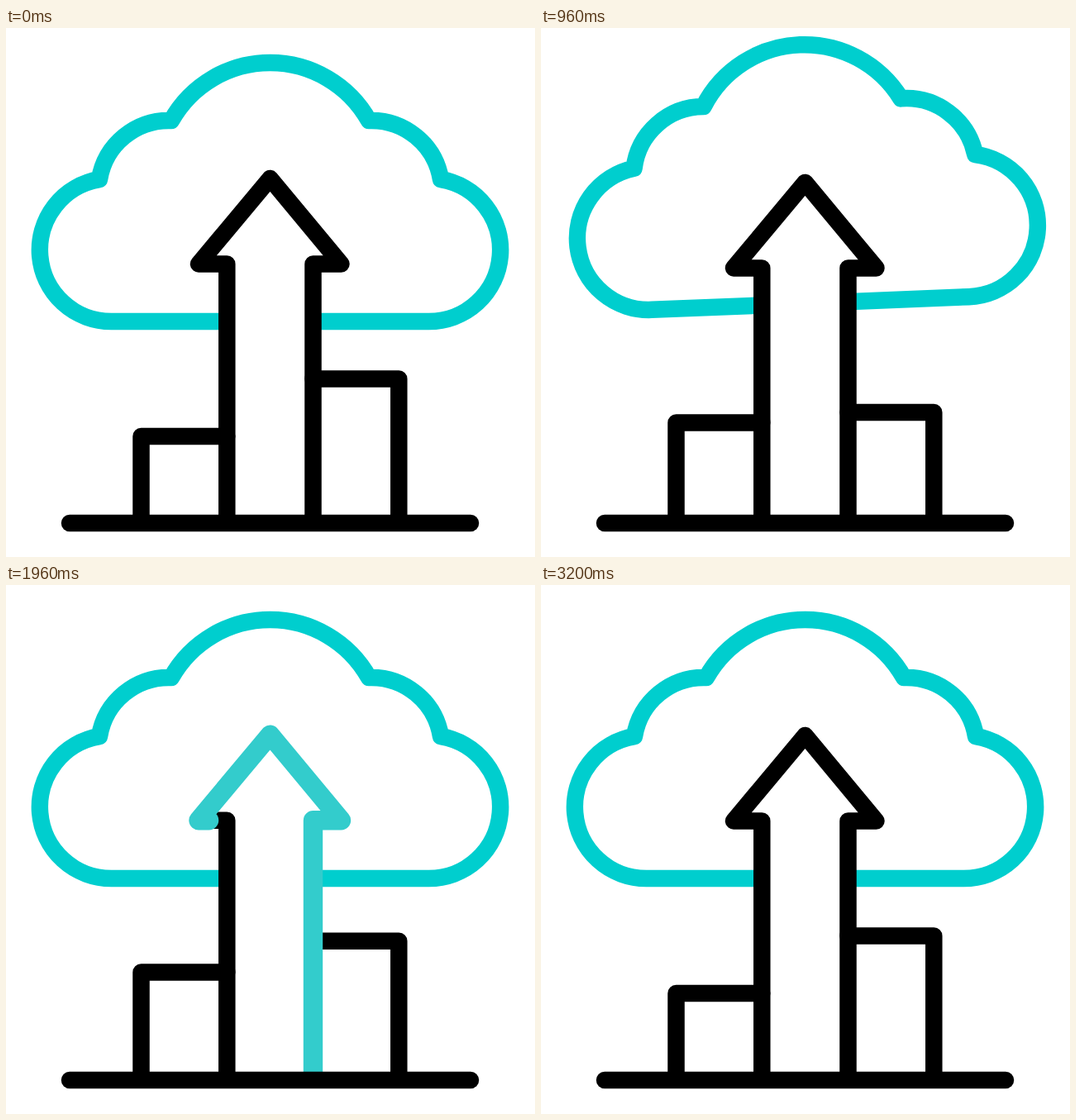
Write an HTML page that moves like this. It is 640 by 640 pixels and loops after 3480 ms.

```html
<!DOCTYPE html>
<html lang="en">
<head>
<meta charset="utf-8">
<title>Cloud growth</title>
<style>
  html, body { margin: 0; width: 100%; height: 100%; overflow: hidden; background: #fff; }
  svg { display: block; width: 100vw; height: 100vh; }
  path { fill: none; stroke: #000; stroke-width: 20.5; stroke-linecap: round; stroke-linejoin: round; }
  #cloud { stroke: #00cece; }
  #arrow { fill: #fff; }
  #sweep { stroke: #33cccc; stroke-width: 23.4; }
</style>
</head>
<body>
<svg viewBox="0 0 640 640">
  <path id="cloud" d="M127.5 355A86.5 86.5 0 0 1 113 183.2A85 85 0 0 1 200 112A137 137 0 0 1 439 112A85 85 0 0 1 526 183.2A86.5 86.5 0 0 1 511.5 355Z"/>
  <path id="arrow"/>
  <path id="left"/>
  <path id="right"/>
  <path id="sweep" pathLength="1"/>
  <path d="M77 599H562"/>
</svg>
<script>
const LOOP = 3480, STEP = 40, FOOT = 592;
const el = id => document.getElementById(id);
const ease = x => (1 - Math.cos(Math.PI * Math.min(1, Math.max(0, x)))) / 2;

// Sum of eased moves: from rest through each [time, value] turning point.
function through(t, begin, ...turns) {
  let time = begin, value = 0, sum = 0;
  for (const [nextTime, next] of turns) {
    sum += (next - value) * ease((t - time) / (nextTime - time));
    [time, value] = [nextTime, next];
  }
  return sum;
}

// The one bounce that both bars and the arrow follow, each with its own delay.
const bounce = t => through(t, 185,
  [745, 45], [1120, -76], [1440, 45], [1830, -36], [2250, 1.5], [2540, 0]);
const tilt = t => through(t, 0, [600, 3.1], [1090, -3.4], [1410, 0]);
const lift = t => through(t, 605, [840, -27.5], [1240, 0]);
const trim = (t, begin) => ease((t - begin) / 600);

function draw(t) {
  el('cloud').setAttribute('transform',
    `translate(0 ${lift(t)}) rotate(${tilt(t)} 319.5 198)`);
  el('left').setAttribute('d', `M163.5 ${FOOT}V${494 + 0.85 * bounce(t - 20)}H267.3`);
  el('right').setAttribute('d', `M475.3 ${FOOT}V${424.5 + bounce(t - 330)}H371.5`);

  const y = bounce(t - 655), base = 285.5 + y;
  const outline = `M371.5 ${FOOT}V${base}H405.5L319.5 ${182 + y}L233 ${base}H267.3V${FOOT}`;
  el('arrow').setAttribute('d', outline);

  const sweep = el('sweep'), head = trim(t, 1600), tail = trim(t, 2070);
  sweep.setAttribute('d', outline);
  sweep.setAttribute('stroke-dasharray', `${head - tail} 2`);
  sweep.setAttribute('stroke-dashoffset', -tail);
  sweep.setAttribute('visibility', head > tail ? 'visible' : 'hidden');
}

const start = performance.now();
function tick() {
  const t = (performance.now() - start) % LOOP;
  draw(Math.floor(t / STEP) * STEP);
  requestAnimationFrame(tick);
}
tick();
</script>
</body>
</html>
```
